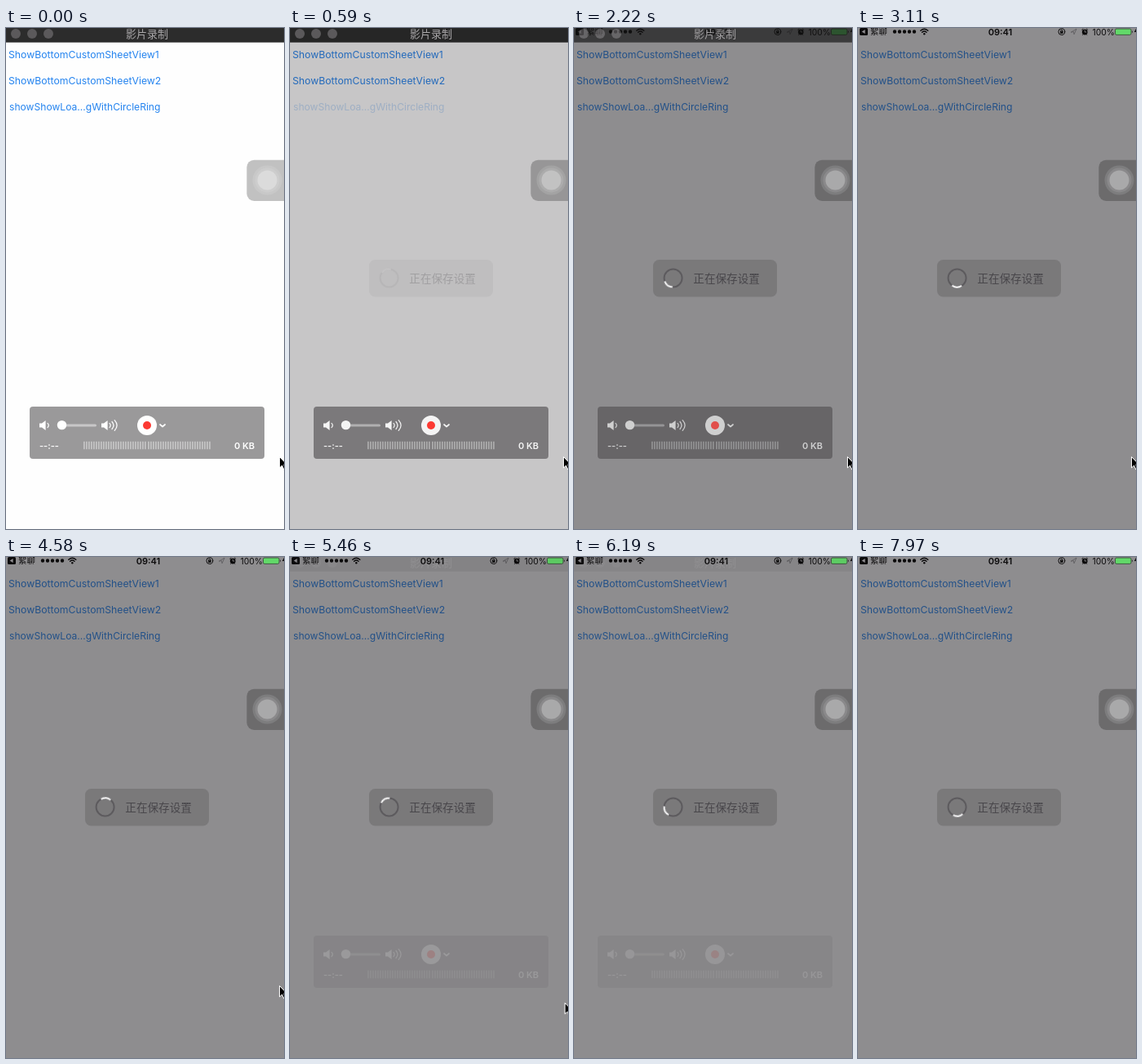
Animation, 341 px wide and 614 px high, one loop 8000 ms. Source, as an HTML page:

```html
<!DOCTYPE html>
<html lang="zh-Hans">
<head>
<meta charset="utf-8">
<title>Loading ring</title>
<style>
  html, body { margin: 0; width: 100%; height: 100%; overflow: hidden; background: #fff; }
  svg { display: block; width: 341px; height: 614px; }
  text { font-family: Inter, "Noto Sans CJK SC", "Noto Sans CJK", sans-serif; }

  .link { font-size: 12.25px; fill: #2584ef; }
  .dim { fill: rgb(33, 30, 34); fill-opacity: .5; }
  .bold { font-size: 11px; font-weight: 600; }
  .line { fill: none; stroke-linecap: round; stroke-linejoin: round; }

  .pressed, .dim, .hud, .ring, .spin, .status, .bar, .panel, .whites, .cursor {
    animation: 8s step-end infinite;
  }
  .pressed { animation-name: press; font-size: 12.1px; }
  .dim { animation-name: dim; }
  .hud { animation-name: hud; }
  .ring { animation-name: ring; }
  .spin { animation-name: spin; transform-origin: 121.6px 306.5px; }
  .status { animation-name: status; }
  .bar { animation-name: bar; }
  .panel { animation-name: panel; }
  .whites { animation-name: whites; }
  .cursor { animation-name: cursor; }

  /* One tick is 1.841% of the loop; the first falls at 7.375%. */
  @keyframes press {
    0% { opacity: 1; }
    7.375% { opacity: .25; }
    9.216% { opacity: .5; }
    11.06% { opacity: .75; }
    12.9%, 100% { opacity: 1; }
  }
  @keyframes dim {
    0% { opacity: 0; }
    7.375% { opacity: .5; }
    9.216%, 100% { opacity: 1; }
  }
  @keyframes hud {
    0% { opacity: 0; }
    7.375% { opacity: .3; }
    9.216% { opacity: .9; }
    11.06%, 100% { opacity: 1; }
  }
  @keyframes ring {
    0% { opacity: .3; }
    9.216% { opacity: .6; }
    11.06%, 100% { opacity: 1; }
  }
  @keyframes spin {
    0% { transform: rotate(-21deg); }
    7.375% { transform: rotate(-21deg); animation-timing-function: steps(50); }
    99.44%, 100% { transform: rotate(2694deg); }
  }
  @keyframes status {
    0% { opacity: 0; }
    25.79% { opacity: .5; }
    27.63%, 100% { opacity: 1; }
  }
  @keyframes bar {
    0% { opacity: 1; }
    25.79% { opacity: .88; }
    27.63% { opacity: .75; animation-timing-function: steps(4); }
    35% { opacity: 0; }
    66.3% { opacity: .06; animation-timing-function: steps(3); }
    71.8% { opacity: .13; animation-timing-function: steps(3); }
    77.3% { opacity: .07; }
    79.2%, 100% { opacity: 0; }
  }
  @keyframes panel {
    0% { opacity: 1; }
    25.79% { opacity: .88; }
    27.63% { opacity: .75; animation-timing-function: steps(4); }
    35% { opacity: 0; }
    66.3% { opacity: .1; animation-timing-function: steps(3); }
    71.8% { opacity: .22; animation-timing-function: steps(3); }
    77.3% { opacity: .11; }
    79.2%, 100% { opacity: 0; }
  }
  @keyframes whites {
    0% { opacity: 1; }
    7.375% { opacity: .92; }
    9.216%, 100% { opacity: .85; }
  }
  @keyframes cursor {
    0% { transform: translate(335px, 525px); }
    66.3% { transform: translate(335px, 525px); animation-timing-function: steps(3); }
    71.8% { transform: translate(340px, 588px); }
    73.7%, 100% { transform: translate(350px, 600px); }
  }
</style>
</head>
<body>
<svg viewBox="0 0 341 614">
  <rect width="341" height="614" fill="#fefefe"/>

  <g class="link">
    <text x="3" y="37">ShowBottomCustomSheetView1</text>
    <text x="3" y="69">ShowBottomCustomSheetView2</text>
    <text x="4" y="101" class="pressed">showShowLoa...gWithCircleRing</text>
  </g>

  <rect class="dim" width="341" height="614"/>

  <g class="hud">
    <rect x="97" y="284" width="152" height="45.5" rx="7.5" fill="#000" fill-opacity=".14"/>
    <text x="146.3" y="311.5" font-size="13.6" fill="#48464a">正在保存设置</text>
    <g class="ring" fill="none" stroke-width="2">
      <circle cx="121.6" cy="306.5" r="11" stroke="#5d5b5e"/>
      <!-- 65 degree arc centred at twelve o'clock -->
      <path class="spin" d="M115.69 297.22A11 11 0 0 1 127.51 297.22" stroke="#fff"/>
    </g>
  </g>

  <!-- floating touch button -->
  <rect x="295.3" y="161.7" width="60" height="50.3" rx="9" fill="#000" fill-opacity=".24"/>
  <g fill="#fff">
    <circle cx="320.5" cy="186.5" r="18" fill-opacity=".12"/>
    <circle cx="320.5" cy="186.5" r="15" fill-opacity=".1"/>
    <circle cx="320.5" cy="186.5" r="12" fill-opacity=".27"/>
  </g>

  <g class="status" fill="#0b0a0b">
    <rect x="2" y="0" width="10" height="9" rx="1.5"/>
    <path d="M8.6 2V7L4.6 4.5Z" fill="#908e91"/>
    <text x="15" y="8.4" font-size="10.4">絮聊</text>
    <path class="line" d="M45 4.5H70" stroke="#0b0a0b" stroke-width="4.4" stroke-dasharray="0 6"/>
    <path class="line" d="M76.8 3.2Q81.3 -.8 85.8 3.2M78.6 5.2Q81.3 2.9 84 5.2" stroke="#0b0a0b" stroke-width="1.4"/>
    <circle cx="81.3" cy="7.2" r="1.2"/>
    <text x="174.5" y="8.6" class="bold" text-anchor="middle">09:41</text>
    <g class="line" stroke="#0b0a0b">
      <circle cx="249.8" cy="4.6" r="3.9"/>
      <path d="M248.6 4.2V3.2Q249.8 1.6 251 3.2V4.2"/>
      <path d="M261.5 5L268 1.2L265 7.8L264.5 5Z" stroke="#555356" stroke-width=".7"/>
      <path d="M274.6 2.2L276 1M280.4 1L281.8 2.2M276 8L275.5 8.5M280.4 8L280.9 8.5" stroke-width=".8"/>
    </g>
    <rect x="248.1" y="4.1" width="3.4" height="2.7"/>
    <circle cx="278.2" cy="5" r="3.4"/>
    <path class="line" d="M278.2 3V5H279.8" stroke="#908e91" stroke-width=".8"/>
    <text x="287.5" y="8.5" font-size="10.3">100%</text>
    <rect x="315.5" y="1" width="19.5" height="7.4" rx="1.6" fill="#62d969" stroke="#3a4a3c" stroke-width=".9"/>
    <path d="M336.2 3.2Q337.8 4.7 336.2 6.2Z"/>
    <path d="M341 .8L338.9 5H341Z"/>
  </g>

  <g class="bar">
    <rect width="341" height="17.7" fill="rgb(19,18,19)" fill-opacity=".89"/>
    <g fill="#5b595b">
      <circle cx="12" cy="7" r="6"/>
      <circle cx="32" cy="7" r="6"/>
      <circle cx="52" cy="7" r="6"/>
    </g>
    <text x="173" y="12" font-size="13" text-anchor="middle" fill="#a9a7a9">影片录制</text>
  </g>

  <g class="panel">
    <rect x="29" y="464" width="288" height="64" rx="4" fill="rgb(19,18,19)" fill-opacity=".423"/>
    <g class="whites" fill="#fff">
      <path id="horn" d="M41 484.6H44L48.6 481V493L44 489.4H41Z"/>
      <use href="#horn" x="76"/>
      <g class="line" stroke="#fff" stroke-width="1.2">
        <path d="M51 484.4Q53.6 487 51 489.6"/>
        <path d="M127 484.4Q129.4 487 127 489.6M130 482.5Q134 487 130 491.5M133.2 480.6Q139 487 133.2 493.4"/>
        <path d="M189 486L192 488.6L195 486" stroke-width="1.7"/>
      </g>
      <path class="line" d="M65 487H109.5" stroke="#fff" stroke-opacity=".45" stroke-width="3"/>
      <circle cx="68.5" cy="486.6" r="5.7"/>
      <circle cx="173" cy="487" r="12"/>
      <text x="41" y="516" class="bold">--:--</text>
      <text x="305" y="516" class="bold" text-anchor="end">0 KB</text>
      <path d="M95 511.5H172M174 511.5H251.5" stroke="#fff" stroke-opacity=".4" stroke-width="9.5" stroke-dasharray="1.8 1.2"/>
    </g>
    <circle cx="173" cy="487" r="5" fill="#fc3a33"/>
  </g>

  <path class="cursor" d="M.5 .5V14L3.6 11.2L5.8 16.2L8 15.2L5.8 10.4H10Z" fill="#000" stroke="#fff" stroke-width="1"/>
</svg>
</body>
</html>
```
